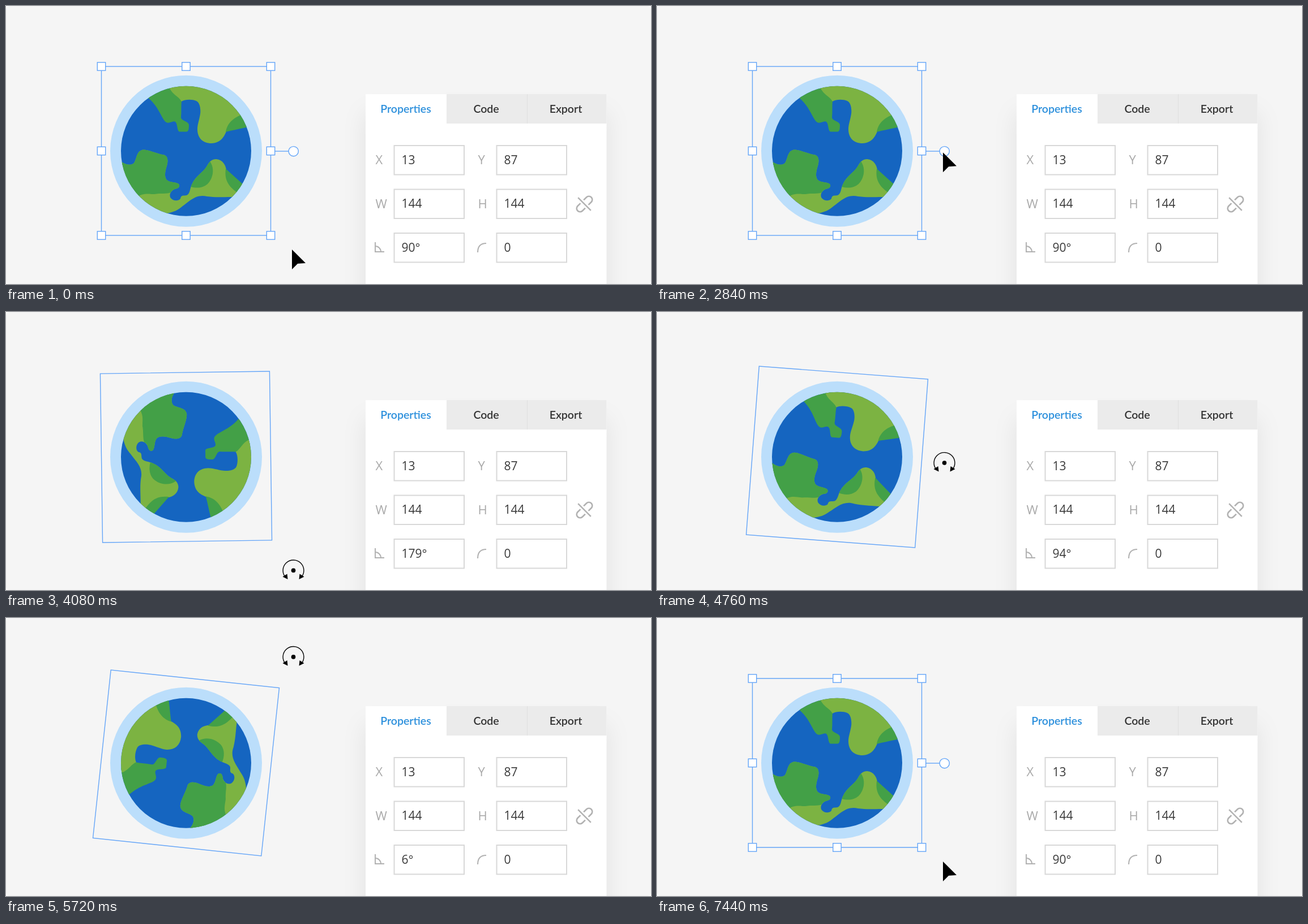
These frames come from a looping animation (1139x492 px, 7.48 s). An HTML page:

```html
<!DOCTYPE html>
<html lang="en">
<head>
<meta charset="utf-8">
<title>Rotate handle</title>
<style>
  html, body { margin: 0; width: 100%; height: 100%; overflow: hidden; background: #fff; }
  svg { display: block; width: 100%; height: 100%; }
  .panel { filter: drop-shadow(0 34px 20px rgba(0, 0, 0, .08)); }
  .tab { font: 600 19.5px Lato, sans-serif; text-anchor: middle; fill: #333; }
  .label, .value { font: 22px "Open Sans", "Noto Sans", sans-serif; fill: #a9a9a9; }
  .value { font-size: 21px; fill: #3a3a3a; }
  .field { fill: #fff; stroke: #d8d8d8; stroke-width: 2; }
  .icon { fill: none; stroke: #b2b2b2; stroke-width: 2; }
  .select { fill: none; stroke: #64a5f8; stroke-width: 1.4; }
  .handle { fill: #fff; stroke: #64a5f8; stroke-width: 1.4; }
  .dark { fill: #43a047; }
  .light { fill: #7cb342; }
</style>
</head>
<body>
<svg viewBox="0 0 1139 492">
  <defs><clipPath id="disc"><circle cx="318" cy="256.7" r="115"/></clipPath></defs>
  <rect width="1139" height="492" rx="6" fill="#f5f5f5"/>

  <rect class="panel" x="635" y="156" width="425.5" height="420" fill="#fff"/>
  <path d="M778 156H1060.5V208H778Z" fill="#ebebeb"/>
  <path d="M920.5 156V208" stroke="#e0e0e0"/>
  <text class="tab" x="706" y="189" style="fill:#2b8fdc">Properties</text>
  <text class="tab" x="848" y="189">Code</text>
  <text class="tab" x="988.5" y="189">Export</text>
  <g id="fields"></g>
  <path class="icon" d="M652 418V435H668M652 425A10 10 0 0 1 662 435"/>
  <path class="icon" d="M833 436C833 426 838 420 848 420"/>
  <path class="icon" style="stroke-width:2.6" transform="translate(1021.5 350.5) rotate(-45)"
    d="M-4-6H-11A6 6 0 0 0-11 6H-4M4-6H11A6 6 0 0 1 11 6H4M0-16V16"/>

  <circle cx="318" cy="256.7" r="134" fill="#bbdefb"/>
  <g clip-path="url(#disc)">
    <g id="globe">
      <circle cx="318" cy="256.7" r="118" fill="#1565c0"/>
      <path class="dark" d="M244 157C266 172 271 190 279 202C286 212 292 203 298 204.5C304 207 301 222 307 222.5H319C323 222 323 215 323 210C322 204 309 203 309 197C310 187 309 178 310 168L290 130Z"/>
      <path class="light" d="M286 138C292 158 304 158 310 169C316 165 329 165 336 168C343 171 344 184 343 191C341 203 338 210 338 218C338 233 347 243 363 243C380 242 385 231 389 222L440 200L400 120H290Z"/>
      <path class="dark" d="M420 191C405 196 391 205 388 223C393 221 412 218 440 211V190Z"/>
      <path class="light" id="south"/>
      <path class="dark" id="west"/>
      <path class="dark" d="M326.5 320L328 316C335 300 348 295 355 283L360 275C369 287 366 305 356 315C348 322 337 323 326.5 320Z"/>
      <path class="dark" d="M388 288L430 326L416 336C402 325 384 316 388 288Z"/>
    </g>
  </g>

  <rect class="select" id="box" x="168.5" y="107" width="299" height="299"/>
  <g id="handles">
    <path class="select" d="M467 257H499"/>
    <circle class="handle" cx="507.7" cy="257.2" r="8.6"/>
  </g>
  <path id="arrow" d="M0-1L24 23L10 24L0 34Z"/>
  <g id="turner">
    <circle r="3.8"/>
    <path d="M-14 12A18.4 18.4 0 1 1 14 12" fill="none" stroke="#000" stroke-width="1.4"/>
    <path d="M-19 11L-10 15.5L-11 6ZM19 11L10 15.5L11 6Z"/>
  </g>
</svg>
<script>
const $ = id => document.getElementById(id);

// Land
const coast = "M198 270C206 280 219 284 226 278C231 271 230 256 242 254.5C252 254 268 262 279 263.5" +
  "C287 266 286 276 284 283C281 292 279 302 284 308C290 313 300 311 305 315C308 319 305 323 298 324";
$("south").setAttribute("d", coast +
  "C289 328 288 336 291 340C295 345 304 346 308 341C309 334 314 336 319 335C325 333 325 322 328 316" +
  "C335 300 348 295 355 283C359 275 364 271 371 271C383 272 388 282 389 290L425 323L418 338H399" +
  "C380 338 370 339 355 337C335 332 324 346 312 354C304 361 296 365 284 367L270 400L180 330Z");
$("west").setAttribute("d", coast +
  "C294 325 292 327 291 330C284 333 272 331 262 333C250 333 243 330 228 340L180 330Z");

// Form fields and selection handles
const field = (label, value, x, y, id = "") => `
  <text class="label" x="${x - 33}" y="${y + 34}">${label}</text>
  <rect class="field" x="${x}" y="${y + 1}" width="123.5" height="51.5"/>
  <text class="value" id="${id}" x="${x + 13}" y="${y + 33.5}">${value}</text>`;
$("fields").innerHTML =
  field("X", 13, 685.5, 246) + field("Y", 87, 866.5, 246) +
  field("W", 144, 685.5, 323.5) + field("H", 144, 866.5, 323.5) +
  field("", "90°", 685.5, 401, "angle") + field("", 0, 866.5, 401);

for (const x of [168.5, 318, 467.5])
  for (const y of [107, 256.5, 406])
    if (x !== 318 || y !== 256.5)
      $("handles").innerHTML +=
        `<rect class="handle" x="${x - 7.2}" y="${y - 7.2}" width="14.4" height="14.4"/>`;

const cubic = (a, b, c, d, u) => {
  const v = 1 - u;
  return a * v * v * v + 3 * b * v * v * u + 3 * c * v * u * u + d * u * u * u;
};

// Progress from start to end, eased by a curve with handles x1 and x2
function ease(t, start, end, x1 = .33, x2 = .67) {
  const x = Math.min(1, Math.max(0, (t - start) / (end - start)));
  let lo = 0, hi = 1;
  for (let i = 0; i < 24; i++) {
    const mid = (lo + hi) / 2;
    if (cubic(0, x1, x2, 1, mid) < x) lo = mid; else hi = mid;
  }
  return cubic(0, 0, 1, 1, (lo + hi) / 2);
}

const LOOP = 7480, GRAB = 2920, RELEASE = 6840;

const angleAt = t => 90
  + 90 * ease(t, GRAB, 4020, .41, .37)
  - 180 * ease(t, 4020, 5585, .33, .64)
  + 90 * ease(t, 5585, 6440);

function arrowAt(t) {
  if (t < GRAB) {
    const u = ease(t, 2000, GRAB);
    return [cubic(505, 487, 490, 506, u), cubic(432, 380, 308, 257, u)];
  }
  const u = ease(t, 6800, 7440);
  return [cubic(506, 500, 518, 505, u), cubic(257, 310, 470, 432, u)];
}

const show = (id, on) => $(id).setAttribute("visibility", on ? "visible" : "hidden");
const place = (id, transform) => $(id).setAttribute("transform", transform);

function draw(now) {
  const t = Math.floor((now % LOOP) / 40) * 40;
  const held = t >= GRAB && t < RELEASE;
  const angle = angleAt(t), turn = angle - 90;

  place("globe", `rotate(${turn} 318 256.7)`);
  place("box", `rotate(${turn} 318 256.5)`);
  place("turner", `translate(507.5 ${257.2 + 2.244 * turn})`);
  place("arrow", `translate(${arrowAt(t)})`);
  $("angle").textContent = Math.round(angle) + "°";
  show("handles", !held);
  show("arrow", !held);
  show("turner", held);
}

let begin;
function tick(now) {
  begin ??= now;
  draw(now - begin);
  requestAnimationFrame(tick);
}
draw(0);
requestAnimationFrame(tick);
</script>
</body>
</html>
```
